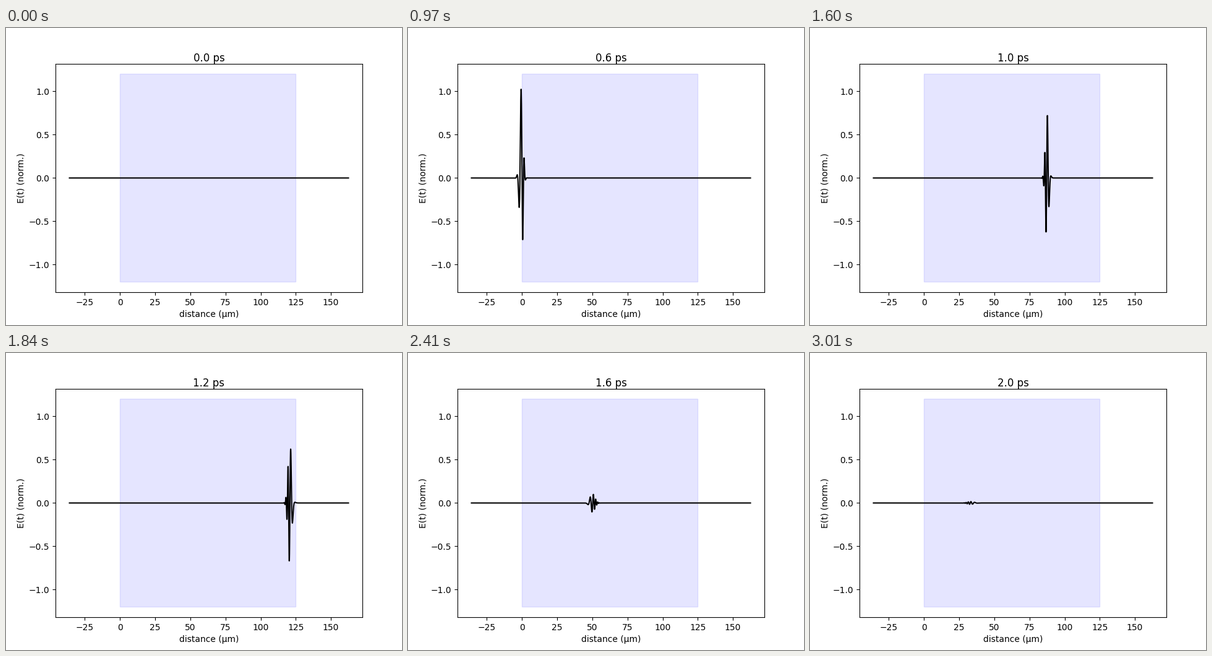
Animation of 640 by 480 pixels, one loop 3040 ms. Source, as a matplotlib script:

```python
import numpy as np
import matplotlib.pyplot as plt
from matplotlib.animation import FuncAnimation
from matplotlib.patches import Rectangle

C = 299.792458            # um / ps
LENGTH = 125.0            # slab thickness, um
F0, BAND = 100.0, 50.0    # carrier and bandwidth, THz
T0 = 0.62                 # arrival at the slab, ps
DT = 0.02                 # ps per step
STEPS = 100
LOOP, TICK = 3040, 10     # ms


def pulse_field(x, t):
    """Short pulse crossing a dispersive slab with all internal echoes."""
    df = 0.2
    f = np.arange(df, 300, df)
    k = 2 * np.pi * f / C
    n = 1.4097 + 0.015 * f / F0
    kn = k * n

    def gauss(v):
        return np.exp(-(v / BAND) ** 2) / (BAND * np.sqrt(np.pi))

    spectrum = (gauss(f - F0) - gauss(f + F0)) * df

    r = (n - 1) / (n + 1)
    t_in, t_out = 2 / (n + 1), 2 * n / (n + 1)
    trip = np.exp(2j * kn * LENGTH)
    echo = 1 / (1 - r ** 2 * trip)
    back = -r + t_in * t_out * r * trip * echo

    before = x[x < 0][:, None]
    inside = x[(x >= 0) & (x <= LENGTH)][:, None]
    after = x[x > LENGTH][:, None]
    modes = np.vstack([
        np.exp(1j * k * before) + back * np.exp(-1j * k * before),
        t_in * echo * (np.exp(1j * kn * inside)
                       + r * trip * np.exp(-1j * kn * inside)),
        t_in * t_out * echo * np.exp(1j * (kn * LENGTH + k * (after - LENGTH))),
    ])
    phase = np.exp(-2j * np.pi * np.outer(f, t - T0))
    return -((modes * spectrum) @ phase).imag


def step_at(ms):
    """Steps come in groups of five until the pulse enters the view."""
    if ms < 730:
        return max(0, 3 + 5 * ((ms - 90) // 160))
    return min(STEPS - 1, 23 + (ms - 730) // 30)


x = np.linspace(-0.12 * C, LENGTH + 0.125 * C, 2400)
times = DT * np.arange(STEPS)
field = pulse_field(x, times)

fig, ax = plt.subplots(figsize=(6.4, 4.8), dpi=100)
ax.add_patch(Rectangle((0, -1.2), LENGTH, 2.4, color="blue", alpha=0.1))
line, = ax.plot(x, np.zeros_like(x), color="black", lw=1.5)
margin = 0.05 * (x[-1] - x[0])
ax.set_xlim(x[0] - margin, x[-1] + margin)
ax.set_ylim(-1.32, 1.32)
ax.set_xlabel("distance (µm)")
ax.set_ylabel("E(t) (norm.)")
clock = ax.text(0.5, 1.01, "0.0 ps", transform=ax.transAxes,
                ha="center", fontsize=12)


def update(i):
    step = step_at(i * TICK)
    line.set_ydata(field[:, step])
    clock.set_text(f"{times[step]:.1f} ps")
    return line, clock


anim = FuncAnimation(fig, update, frames=LOOP // TICK, interval=TICK,
                     repeat=True, blit=False)
plt.show()
```
